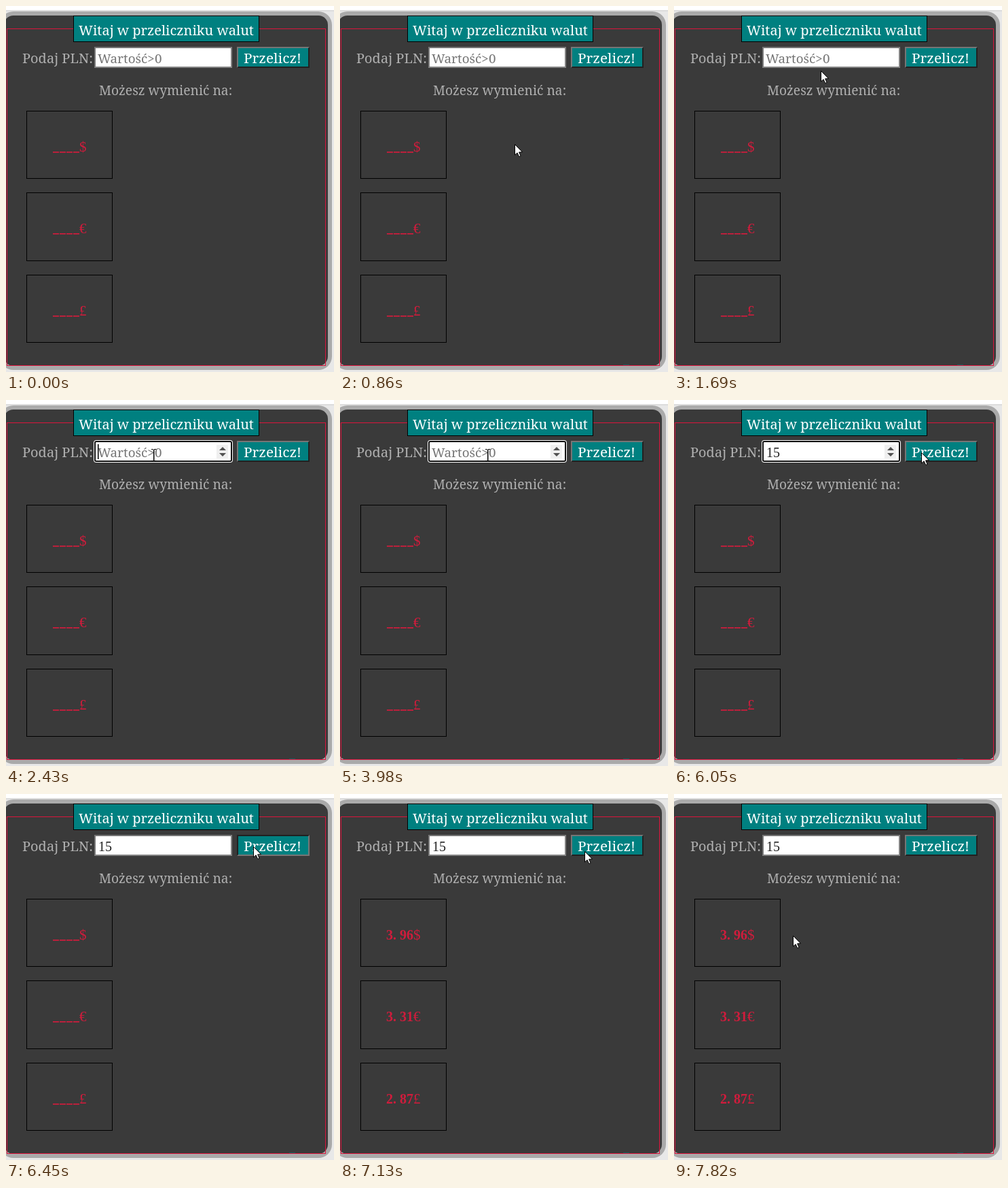
An HTML page with a canvas that plays this animation: 483 px wide and 538 px high, repeating every 8 s.

```html
<!DOCTYPE html>
<html lang="pl">
<head>
<meta charset="utf-8">
<title>Przelicznik walut</title>
<style>
  html, body { margin: 0; width: 100%; height: 100%; overflow: hidden; }
  canvas { display: block; }
</style>
</head>
<body>
<canvas id="stage" width="483" height="538"></canvas>
<script>
const ctx = document.getElementById('stage').getContext('2d');
const LOOP = 8000;
const TEAL = '#008080', DARK = '#3a3a3a', RED = '#d01c3c', LINE = '#dc143c', GREY = '#767676';
const SERIF = '"Noto Serif", serif';
const DIGITS = '"Liberation Serif", serif';

// Pointer path: time, x, y
const PATH = [
  [100, 417, 515], [530, 264, 221], [740, 264, 221], [1550, 216, 103],
  [1690, 216, 95], [1970, 217, 86], [2300, 217, 86], [2430, 217, 81],
  [4910, 217, 81], [5440, 318, 76], [5770, 352, 77], [6050, 364, 77],
  [7070, 364, 77], [7130, 360, 84], [7820, 175, 208]
];
// Times at which the text caret switches on or off
const BLINKS = [2300, 2900, 3450, 3980, 4040, 4770, 5270, 5790, 6350, 6380];

const FOCUS = 2300, TYPE_1 = 4040, TYPE_5 = 4240, PRESS = 6380, RESULT = 6480, RELEASE = 6570;

const AMOUNTS = [
  { y: 154, h: 100, value: '3. 96', sign: '$' },
  { y: 274, h: 101, value: '3. 31', sign: '€' },
  { y: 395, h: 100, value: '2. 87', sign: '£' }
];

function rect(x, y, w, h, color) {
  ctx.fillStyle = color;
  ctx.fillRect(x, y, w, h);
}

function round(x, y, w, h, r, color) {
  ctx.fillStyle = color;
  ctx.beginPath();
  ctx.roundRect(x, y, w, h, r);
  ctx.fill();
}

function text(str, x, y, size, color, family = SERIF, weight = 400) {
  ctx.font = `${weight} ${size}px ${family}`;
  ctx.fillStyle = color;
  ctx.fillText(str, x, y);
}

function poly(points, color) {
  ctx.beginPath();
  points.forEach(([x, y]) => ctx.lineTo(x, y));
  ctx.closePath();
  ctx.fillStyle = color;
  ctx.fill();
}

function frame(x, y, w, h, color) {
  ctx.strokeStyle = color;
  ctx.lineWidth = 1;
  ctx.strokeRect(x + 0.5, y + 0.5, w - 1, h - 1);
}

// Box with a two-tone bevelled border
function bevel(x, y, w, h, fill, light, shade) {
  rect(x, y, w, h, shade);
  poly([[x, y], [x + w, y], [x + w - 2, y + 2], [x + 2, y + h - 2], [x, y + h]], light);
  rect(x + 2, y + 2, w - 4, h - 4, fill);
}

function pointerAt(t) {
  if (t < PATH[0][0]) return null;
  for (let i = 1; i < PATH.length; i++) {
    const [t0, x0, y0] = PATH[i - 1], [t1, x1, y1] = PATH[i];
    if (t < t1) {
      const k = (t - t0) / (t1 - t0);
      return { x: Math.round(x0 + (x1 - x0) * k), y: Math.round(y0 + (y1 - y0) * k) };
    }
  }
  const [, x, y] = PATH[PATH.length - 1];
  return { x, y };
}

// The fieldset outline is grey until the pointer first reaches the card
function drawCard(t) {
  rect(0, 0, 483, 538, '#e8e8e8');
  rect(0, 0, 483, 6, '#fff');
  rect(0, 6, 483, 2, '#dcdcdc');
  round(-9, 8, 489, 527, 20, '#aaa');
  round(-3, 14, 477, 515, 14, DARK);

  frame(1, 33, 470, 496, LINE);
  if (t >= 170) rect(417, 527, 9, 1, '#176464');

  rect(99, 14, 274, 39, TEAL);
  frame(99, 14, 274, 39, '#000');
  text('Witaj w przeliczniku walut', 107, 43, 20, '#fff');
  text('Podaj PLN:', 24, 84, 20, '#b0b0b0');
  text('Możesz wymienić na:', 137, 131, 19.2, '#b0b0b0');
}

function drawSpinner(p) {
  rect(310, 66, 17, 20, '#efefef');
  if (p && p.x >= 310 && p.x < 327 && p.y >= 66 && p.y < 86) rect(310, 76, 17, 10, '#c8c8c8');
  poly([[314, 74], [319, 69], [324, 74]], '#505050');
  poly([[314, 78], [319, 83], [324, 78]], '#505050');
}

function drawInput(t, p, hover) {
  const focused = t >= FOCUS && t < PRESS;
  if (focused) {
    round(129, 59, 205, 33, 4, '#fff');
    round(130, 60, 203, 31, 3, '#101010');
    round(132, 62, 199, 27, 1, '#fff');
  } else {
    bevel(130, 60, 203, 31, '#fff', GREY, '#858585');
  }
  const typed = t < TYPE_1 ? '' : t < TYPE_5 ? '1' : '15';
  if (typed) text(typed, 136, 84, 20, '#222', DIGITS);
  else text('Wartość>0', 135, 84, 18.9, '#757575');

  if (focused || hover) drawSpinner(p);
  const flips = BLINKS.filter(b => t >= b).length;
  if (flips % 2) rect(135 + typed.length * 9.5, 65, 1.5, 22, '#000');
}

function drawButton(t) {
  const down = t >= PRESS && t < RELEASE;
  const light = GREY, shade = '#212121';
  bevel(340, 60, 107, 31, TEAL, down ? shade : light, down ? light : shade);
  text('Przelicz!', 350, 84, 20.8, '#fff');
}

function drawAmounts(t) {
  for (const { y, h, value, sign } of AMOUNTS) {
    frame(30, y, 127, h, '#000');
    const base = y + 60;
    if (t >= RESULT) {
      text(value, 68, base, 20, RED, DIGITS, 700);
    } else {
      for (let i = 0; i < 4; i++) rect(69 + i * 10, base, 9, 1.7, RED);
    }
    text(sign, 108, base, 21, RED, DIGITS);
  }
}

function drawArrow({ x, y }) {
  ctx.save();
  ctx.translate(x + 0.5, y + 0.5);
  poly([[0, 0], [0, 15.5], [3.6, 12.3], [6.2, 18], [8.6, 17], [6.1, 11.4], [11, 11.2]], '#fff');
  ctx.strokeStyle = '#000';
  ctx.lineWidth = 1;
  ctx.stroke();
  ctx.restore();
}

function drawBeam({ x, y }) {
  rect(x, y - 8, 1.5, 16, '#000');
  for (const end of [y - 9, y + 8]) {
    rect(x - 3, end, 3, 1, '#000');
    rect(x + 1, end, 3, 1, '#000');
  }
}

function draw(t) {
  const p = pointerAt(t);
  const hover = p && p.x >= 130 && p.x < 333 && p.y >= 60 && p.y < 91;
  drawCard(t);
  drawInput(t, p, hover);
  drawButton(t);
  drawAmounts(t);
  if (p) (hover && p.x < 309 ? drawBeam : drawArrow)(p);
}

const start = performance.now();
function tick(now) {
  draw(Math.max(0, now - start) % LOOP);
  requestAnimationFrame(tick);
}
draw(0);
requestAnimationFrame(tick);
</script>
</body>
</html>
```
